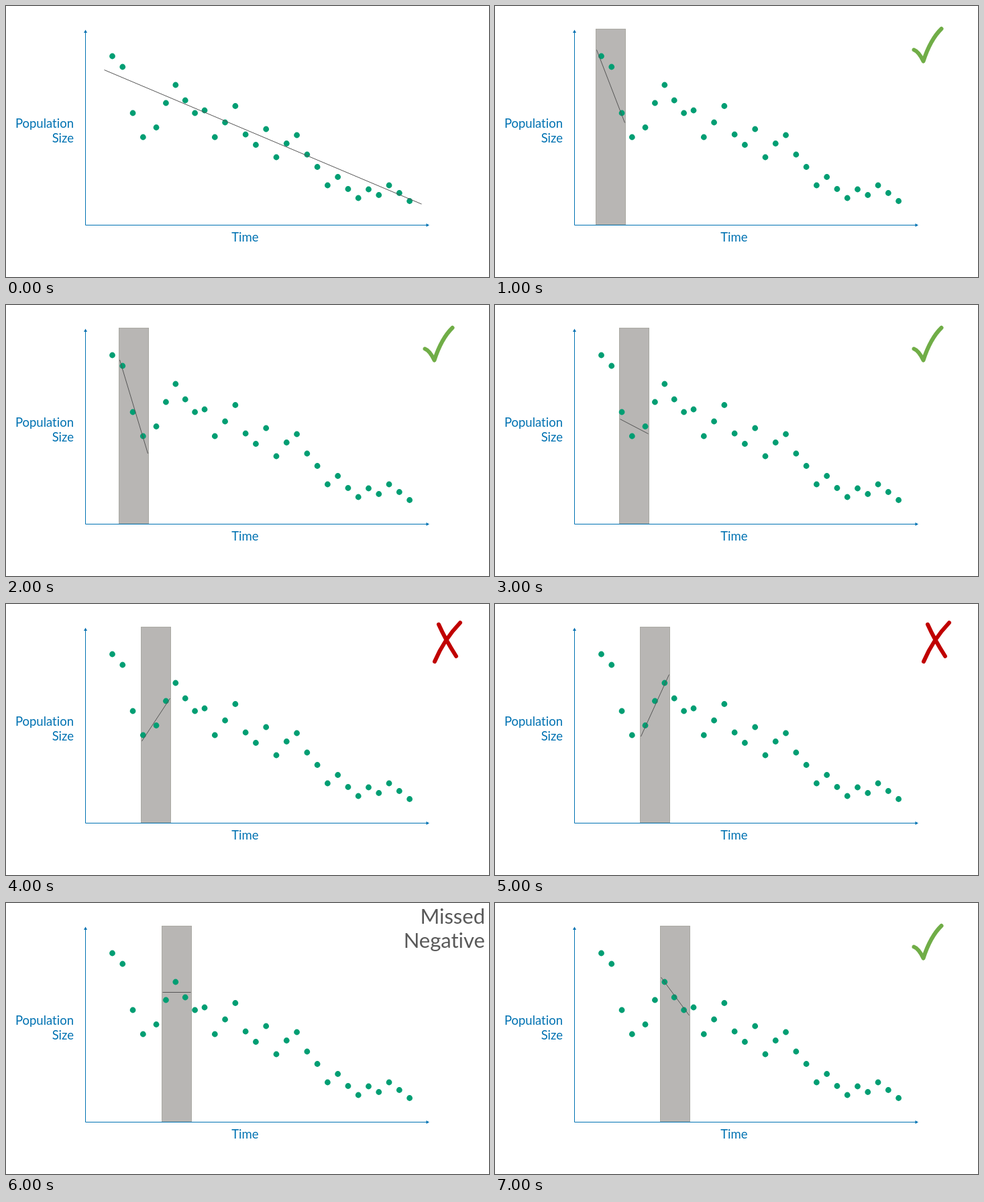
An HTML page that plays this animation: 720 px wide and 405 px high, repeating every 8000 ms.

```html
<!DOCTYPE html>
<html lang="en">
<head>
<meta charset="utf-8">
<title>Population trend windows</title>
<style>
  html, body { margin: 0; width: 100%; height: 100%; overflow: hidden; background: #fff; }
  svg { display: block; width: 100vw; height: 100vh; }
  text { font: 18.5px Lato, sans-serif; font-variant-ligatures: none; fill: #0072b2; text-anchor: end; }
  #missed text { font-size: 31px; fill: #595959; }
  #check, #cross { fill: none; stroke-width: 6; stroke-linecap: round; stroke-linejoin: round; }
</style>
</head>
<body>
<svg viewBox="0 0 720 405">
  <rect id="band" y="34.5" width="44" height="292" fill="#b8b6b4" stroke="#aaa9a3"/>
  <path d="M118.5 38V327.5H628" fill="none" stroke="#0072b2"/>
  <path d="M118.5 35.5l2.5 4.5h-5zM631 327.5l-4.5 2.5v-5z" fill="#0072b2"/>
  <g id="dots" fill="#009e73"></g>
  <path id="trend" stroke="#555"/>
  <text x="101" y="182">Population</text>
  <text x="101" y="204">Size</text>
  <text x="376.5" y="352">Time</text>
  <path id="check" stroke="#70ad47" d="M624.5 65.5Q631.5 68 638.5 82.5Q649 50 665.5 34"/>
  <path id="cross" stroke="#c00000" d="M677 28Q653 53 639 86M645 30.5Q655 53 671 78"/>
  <g id="missed">
    <text x="714" y="31">Missed</text>
    <text x="714" y="67">Negative</text>
  </g>
</svg>
<script>
const STEP = 1000;
const $ = id => document.getElementById(id);
const show = (id, on) => $(id).style.display = on ? '' : 'none';

const heights = [
  75, 91, 160, 196, 181.5, 145, 118, 141, 160, 156,
  196, 174, 149.5, 192, 207.5, 184, 226, 205.5, 193, 222,
  240.5, 268, 255.5, 273.5, 287, 274, 282.5, 268, 279.5, 291.5
];
// Even spacing, with a wider gap after the fourth dot that closes up again
const dotX = i => 158.5 + 15.28 * i + (i > 3 ? 0.88 * Math.max(0, 9 - i) : 0);
$('dots').innerHTML = heights.map((y, i) => `<circle cx="${dotX(i)}" cy="${y}" r="4.4"/>`).join('');

// The window advances about one dot per step, by slightly less each time
const bandX = k => Math.floor(150.9 + 17.6 * k - 0.27 * k * k) + 0.5;

// Trend height at both window edges, and the verdict
const windows = [
  [65.5, 174.5, 'check'],
  [82, 222, 'check'],
  [170.5, 192.5, 'check'],
  [205, 141, 'cross'],
  [198, 105.5, 'cross'],
  [133.5, 133.5, 'missed'],
  [111, 168, 'check']
];

function draw(now) {
  const k = Math.floor(now / STEP) % (windows.length + 1) - 1;
  const whole = k < 0;
  const x = bandX(k);
  const [y1, y2, verdict] = whole ? [95.5, 296] : windows[k];
  const [x1, x2] = whole ? [146.5, 619.5] : [x + 1, x + 43];
  $('trend').setAttribute('d', `M${x1} ${y1}L${x2} ${y2}`);
  $('band').setAttribute('x', x);
  show('band', !whole);
  for (const id of ['check', 'cross', 'missed']) show(id, id === verdict);
  requestAnimationFrame(draw);
}
draw(0);
</script>
</body>
</html>
```
